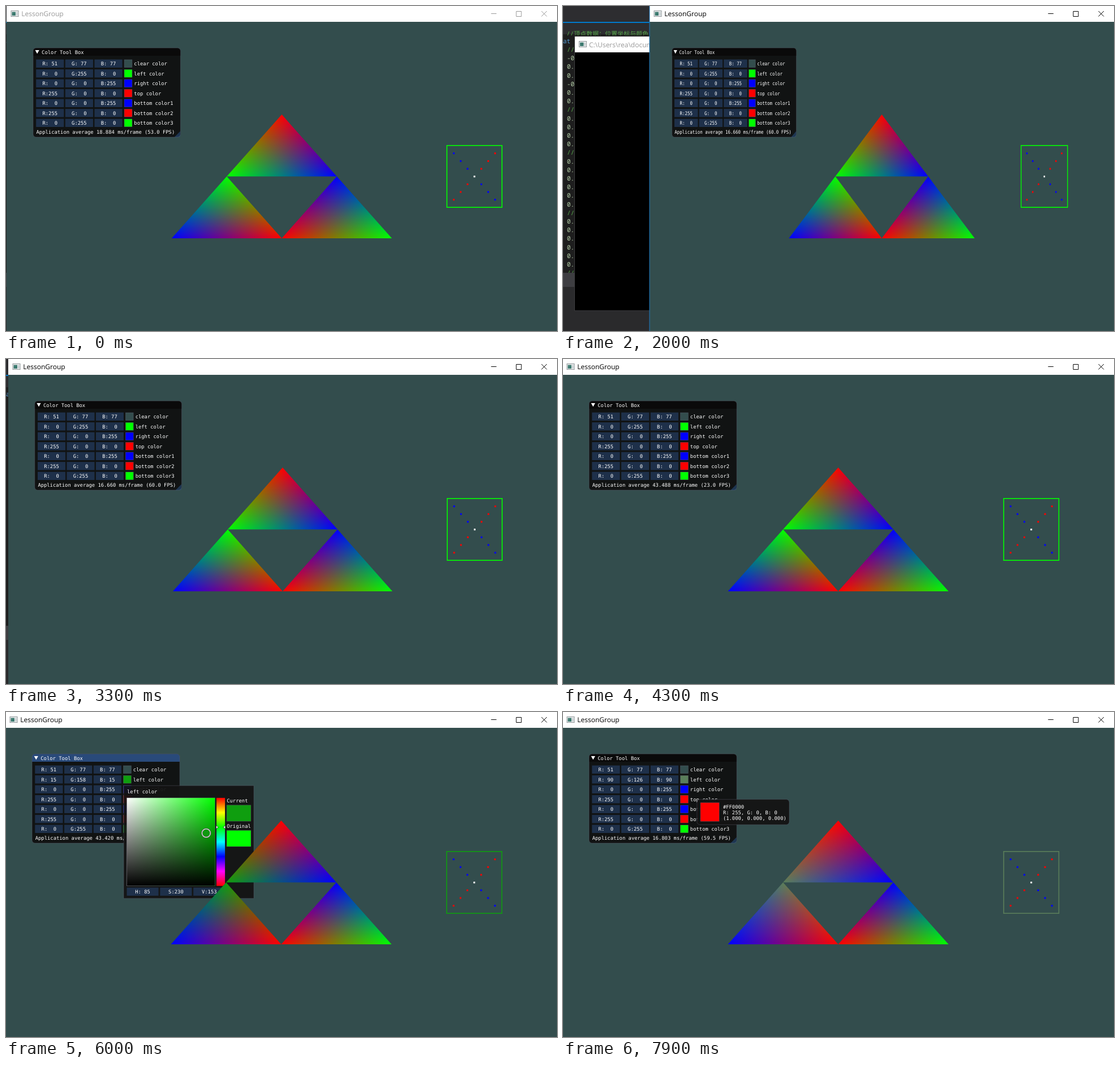
An HTML page that plays this animation: 974x575 px, repeating every 8 s.

```html
<!DOCTYPE html>
<html lang="en">
<head>
<meta charset="utf-8">
<title>Color Tool Box</title>
<style>
html, body { margin: 0; width: 974px; height: 575px; overflow: hidden; background: #1e1e1e; }
svg { display: block; }
text { white-space: pre; text-rendering: geometricPrecision; }
.ui { font: 8.85px "DejaVu Sans Mono", monospace; fill: #fff; }
.win { font: 12px "Open Sans", "Noto Sans", sans-serif; }
.code { font: 11px "Noto Sans Mono", "Noto Sans CJK SC", monospace; }
.tri { isolation: isolate; }
.add { mix-blend-mode: plus-lighter; }
</style>
</head>
<body>
<svg id="stage" width="974" height="575" viewBox="0 0 974 575"></svg>
<script>
const W = 974, H = 575, BAR = 28, LOOP = 8000, STEP = 100;
const MID_Y = (BAR + H) / 2, HALF_H = (H - BAR) / 2;
const BORDER = 'rgba(110,110,128,.45)', FIELD = '#1e304a';
const svg = document.getElementById('stage');

function el(tag, attrs, parent = svg) {
  const node = document.createElementNS('http://www.w3.org/2000/svg', tag);
  for (const k in attrs) node.setAttribute(k, attrs[k]);
  parent.appendChild(node);
  return node;
}
const group = (parent = svg) => el('g', {}, parent);
const rect = (p, x, y, width, height, fill, more = {}) =>
  el('rect', { x, y, width, height, fill, ...more }, p);
const path = (p, d, more) => el('path', { d, ...more }, p);

function text(p, x, y, str, cls = 'ui', more = {}) {
  const node = el('text', { x, y, class: cls, ...more }, p);
  node.textContent = str;
  return node;
}
// Tool text is placed by the middle of its line.
const label = (p, x, mid, str, more) => text(p, x, mid + 3.2, str, 'ui', more);

function field(p, x, y, width, str) {
  rect(p, x, y, width, 14.4, FIELD);
  return label(p, x + width / 2, y + 7.4, str, { 'text-anchor': 'middle' });
}

function gradient(attrs, stops) {
  const g = el('linearGradient', attrs, defs);
  for (const [offset, color, alpha = 1] of stops)
    el('stop', { offset, style: `stop-color:${color};stop-opacity:${alpha}` }, g);
  return `url(#${attrs.id})`;
}
const show = (node, on) => node.setAttribute('display', on ? 'inline' : 'none');

const defs = el('defs', {});

function appIcon(p, x, y) {
  rect(p, x + .5, y + .5, 13, 10, '#f4f4f4', { stroke: '#8a9296' });
  rect(p, x + 2, y + 2.5, 6.5, 6.5, '#3d7a70');
  rect(p, x + 9.5, y + 2.5, 2.5, 6.5, '#c3ccd0');
}

// ---- code editor and console behind the window ----
function buildDesktop() {
  const g = group();
  rect(g, 0, 0, W, H, '#2d2d30');
  rect(g, 0, 28, W, 2, '#007acc');
  rect(g, 0, 50, W, 422, '#1e1e1e');
  const clip = el('clipPath', { id: 'strip' }, defs);
  rect(clip, 0, 44, 160, 8, '#fff');
  text(g, 6, 53, '//顶点数据：位置坐标与颜色', 'code', { fill: '#57a64a', 'clip-path': 'url(#strip)' });
  text(g, 0, 66, 'at v', 'code', { fill: '#569cd6' });
  // c: comment, n: negative number, p: positive number
  [...'cnppnppcppppcppppppcppppppc'].forEach((k, i) => {
    const str = { c: '//', n: '-0.', p: '0.' }[k];
    text(g, 7, 81 + i * 15.2, str, 'code', { fill: k === 'c' ? '#57a64a' : '#b5cea8' });
  });
  rect(g, 0, 472, W, 25, '#3e3e42');
  rect(g, 0, 497, W, 78, '#2a2a2c');
  rect(g, 20.5, 54, 700, 485, '#000', { stroke: '#3c3c3e' });
  rect(g, 21, 54, 700, 28, '#fff');
  appIcon(g, 28, 62);
  text(g, 46, 72.5, 'C:\\Users\\rea\\documents\\', 'win', { fill: '#999' });
}

// ---- window content, laid out for the full width and squeezed as a whole ----
const rows = [
  ['clear color', 51, 77, 77], ['left color', 0, 255, 0], ['right color', 0, 0, 255],
  ['top color', 255, 0, 0], ['bottom color1', 0, 0, 255],
  ['bottom color2', 255, 0, 0], ['bottom color3', 0, 255, 0]
];
const channel = (i, v) => 'RGB'[i] + ':' + String(v).padStart(3);

function buildPanel(p) {
  const g = group(p);
  rect(g, 47, 74.2, 260.8, 157.8, '#0f0f0f', { rx: 5.3, 'fill-opacity': .94 });
  const head = path(g, 'M47 88V79.5a5.3 5.3 0 0 1 5.3-5.3h250.2a5.3 5.3 0 0 1 5.3 5.3V88z', {});
  rect(g, 47, 74.2, 260.8, 157.8, 'none', { rx: 5.3, stroke: BORDER, 'stroke-width': .76 });
  path(g, 'M50.6 78h7.2l-3.6 6.4z', { fill: '#fff' });
  label(g, 62.2, 81.6, 'Color Tool Box');
  let leftFields;
  rows.forEach(([name, ...rgb], i) => {
    const y = 94.6 + i * 17.5;
    const cells = rgb.map((v, c) => field(g, 52.2 + c * 51.7, y, 49.2, channel(c, v)));
    const fill = i === 1 ? 'var(--left)' : `rgb(${rgb})`;
    rect(g, 208.3, y + .4, 13.8, 13.6, fill, { stroke: BORDER, 'stroke-width': .76 });
    label(g, 225.6, y + 7.4, name);
    if (i === 1) leftFields = cells;
  });
  const stats = label(g, 52.6, 222.4, '');
  path(g, 'M307.4 221.5V228a4 4 0 0 1-4 4H297z', { fill: '#4296fa', 'fill-opacity': .27 });
  return { head, leftFields, stats };
}

function buildTip(p, x, y, rgb) {
  const g = group(p);
  const hex = '#' + rgb.map(v => v.toString(16).padStart(2, '0')).join('').toUpperCase();
  rect(g, x, y, 163, 44.8, '#141414', { rx: 5.3, 'fill-opacity': .95, stroke: BORDER, 'stroke-width': .76 });
  rect(g, x + 6.2, y + 5.8, 33, 33, hex, { stroke: BORDER, 'stroke-width': .76 });
  const lines = [hex, `R: ${rgb[0]}, G: ${rgb[1]}, B: ${rgb[2]}`,
    `(${rgb.map(v => (v / 255).toFixed(3)).join(', ')})`];
  lines.forEach((s, i) => label(g, x + 46, y + 13 + i * 9.9, s));
  return g;
}

const SV = { x: 214.3, y: 151.9, size: 155.8 };

function buildPicker(p) {
  const g = group(p), { x, y, size } = SV;
  rect(g, 208.8, 130.2, 229.8, 199.6, '#141414', { 'fill-opacity': .95, stroke: BORDER, 'stroke-width': .76 });
  label(g, 214.8, 141, 'left color');
  rect(g, x, y, size, size, gradient({ id: 'sat' }, [[0, '#fff'], [1, '#0f0']]));
  rect(g, x, y, size, size,
    gradient({ id: 'val', x2: 0, y2: 1 }, [[0, '#000', 0], [1, '#000', 1]]),
    { stroke: BORDER, 'stroke-width': .76 });
  const hues = ['#f00', '#ff0', '#0f0', '#0ff', '#00f', '#f0f', '#f00'];
  rect(g, 372.7, y, 15, size, gradient({ id: 'hue', x2: 0, y2: 1 }, hues.map((c, i) => [i / 6, c])));
  const hy = y + size / 3;
  path(g, `M372 ${hy - 3}l4 3l-4 3zM388.4 ${hy - 3}l-4 3l4 3z`,
    { fill: '#fff', stroke: '#000', 'stroke-width': .6 });
  label(g, 390.8, 157, 'Current');
  rect(g, 390.8, 164.8, 42.6, 28.4, 'var(--left)', { stroke: BORDER, 'stroke-width': .76 });
  label(g, 390.8, 202, 'Original');
  rect(g, 390.8, 209.6, 42.6, 28.4, '#0f0', { stroke: BORDER, 'stroke-width': .76 });
  const hsv = [0, 1, 2].map(i => field(g, 214.3 + i * 58.8, 310.6, 56, 'H: 85'));
  const ring = group(g);
  el('circle', { r: 7.6, fill: 'var(--pick)', stroke: '#555', 'stroke-width': 2.4 }, ring);
  el('circle', { r: 7.4, fill: 'none', stroke: '#e4e4e4', 'stroke-width': 1.3 }, ring);
  return { g, hsv, ring };
}

// Each corner colour fades to nothing at the opposite side; the three layers add up.
let triCount = 0;
function triangle(p, pts, colors) {
  const g = el('g', { class: 'tri' }, p), n = triCount++;
  pts.forEach(([ax, ay], i) => {
    const [bx, by] = pts[(i + 1) % 3], [cx, cy] = pts[(i + 2) % 3];
    const dx = cx - bx, dy = cy - by;
    const k = ((ax - bx) * dx + (ay - by) * dy) / (dx * dx + dy * dy);
    const fill = gradient({
      id: `t${n}${i}`, gradientUnits: 'userSpaceOnUse',
      x1: ax, y1: ay, x2: bx + k * dx, y2: by + k * dy
    }, [[0, colors[i], 1], [1, colors[i], 0]]);
    el('polygon', { points: pts.join(' '), fill, class: 'add' }, g);
  });
}

function buildScene(p) {
  const at = (x, y) => [W / 2 * (1 + x), MID_Y - HALF_H * y];
  const left = 'var(--left)', red = '#f00', green = '#0f0', blue = '#00f';
  const top = at(0, .4), l = at(-.2, 0), r = at(.2, 0);
  const b1 = at(-.4, -.4), b2 = at(0, -.4), b3 = at(.4, -.4);
  triangle(p, [top, l, r], [red, left, blue]);
  triangle(p, [l, b1, b2], [left, blue, red]);
  triangle(p, [r, b2, b3], [blue, red, green]);

  const [bx, by] = at(.6, .2);
  rect(p, bx, by, W * .1, HALF_H * .4, 'none', { style: 'stroke:var(--left)', 'stroke-width': 1.6 });
  const dot = (x, y, c) => {
    const [px, py] = at(.7 + x, y);
    rect(p, px - 1.5, py - 1.3, 3, 3, c);
  };
  for (let i = -3; i <= 3; i++) {
    if (!i) { dot(0, 0, '#fff'); continue; }
    dot(i * .025, -i * .05, blue);
    dot(i * .025, i * .05, red);
  }
}

buildDesktop();
const view = group();
rect(view, 0, BAR, W, H - BAR, '#334d4d');
const panel = buildPanel(view);
const greenTip = buildTip(view, 232.8, 119.7, [0, 255, 0]);
const redTip = buildTip(view, 237.6, 154.6, [255, 0, 0]);
const picker = buildPicker(view);
buildScene(view);

const bar = rect(svg, 0, 0, W + 2, BAR, '#fff');
const caption = group();
appIcon(caption, 7.5, 8);
const title = text(caption, 26.3, 18.3, 'LessonGroup', 'win');
const buttons = path(svg, 'M857.5 13.5h9.5M902 9.5h9v9h-9zM946.5 9l9.5 9.5M956 9l-9.5 9.5',
  { fill: 'none', 'stroke-width': 1 });
const edge = rect(svg, 0, 0, 1, H, '#1a78c2');

// ---- motion ----
function track(keys, t) {
  if (t <= keys[0][0]) return keys[0].slice(1);
  for (let i = 1; i < keys.length; i++) {
    const [t0, ...a] = keys[i - 1], [t1, ...b] = keys[i];
    if (t <= t1) return a.map((v, j) => v + (b[j] - v) * (t - t0) / (t1 - t0));
  }
  return keys[keys.length - 1].slice(1);
}
const leftKeys = [
  [1700, 1], [1800, 29], [1900, 95], [2000, 153], [2400, 180], [2700, 187],
  [2800, 172], [3000, 90], [3200, 15], [3300, 4], [3500, 4], [3600, 1], [3700, -1]
];
// time, saturation, value
const pickKeys = [
  [5600, 1, 1], [6000, .9, .6], [6500, .78, .25], [6680, .756, .306],
  [6700, .749, .337], [7000, .5, .45], [7300, .286, .494]
];

function frameMs(t) {
  if (t < 1500) return 18.884 - .00016 * t;
  if (t < 4100) return 16.66;
  if (t < 6100) return 43.452 + (5200 - t) * .00004;
  return 16.937 - .134 * (t - 6700) / 1200;
}
function greenRgb(t) {
  const [s, v] = track(pickKeys, t);
  const low = Math.round(255 * v * (1 - s));
  return [low, Math.round(255 * v), low];
}

function draw(time) {
  const t = Math.floor(time % LOOP / STEP) * STEP;
  const [x] = track(leftKeys, t);
  view.setAttribute('transform', `translate(${x} 0) scale(${(W - x) / W} 1)`);
  caption.setAttribute('transform', `translate(${x} 0)`);
  bar.setAttribute('x', x);
  edge.setAttribute('x', x - .5);
  edge.setAttribute('fill', t < 2600 ? '#1a78c2' : '#5b7f8c');
  show(edge, x > 10);

  const ink = t < 1000 ? '#999' : '#000';
  title.setAttribute('fill', ink);
  buttons.setAttribute('stroke', ink);

  const rgb = greenRgb(t - 20);
  svg.style.setProperty('--left', `rgb(${rgb})`);
  svg.style.setProperty('--pick', `rgb(${greenRgb(t)})`);
  panel.leftFields.forEach((f, i) => f.textContent = channel(i, rgb[i]));
  panel.head.setAttribute('fill', t >= 5100 && t < 7600 ? '#294a7a' : '#0a0a0a');
  const ms = frameMs(t);
  panel.stats.textContent =
    `Application average ${ms.toFixed(3)} ms/frame (${(1000 / ms).toFixed(1)} FPS)`;

  show(greenTip, t >= 5000 && t < 5400);
  show(redTip, t >= 7800);
  show(picker.g, t >= 5400 && t < 7600);
  const [s, v] = track(pickKeys, t);
  picker.ring.setAttribute('transform',
    `translate(${SV.x + s * SV.size} ${SV.y + (1 - v) * SV.size})`);
  [85, s * 255, v * 255].forEach((n, i) =>
    picker.hsv[i].textContent = 'HSV'[i] + ':' + String(Math.round(n)).padStart(3));
}

const start = performance.now();
function loop() {
  draw(performance.now() - start);
  requestAnimationFrame(loop);
}
loop();
</script>
</body>
</html>
```
